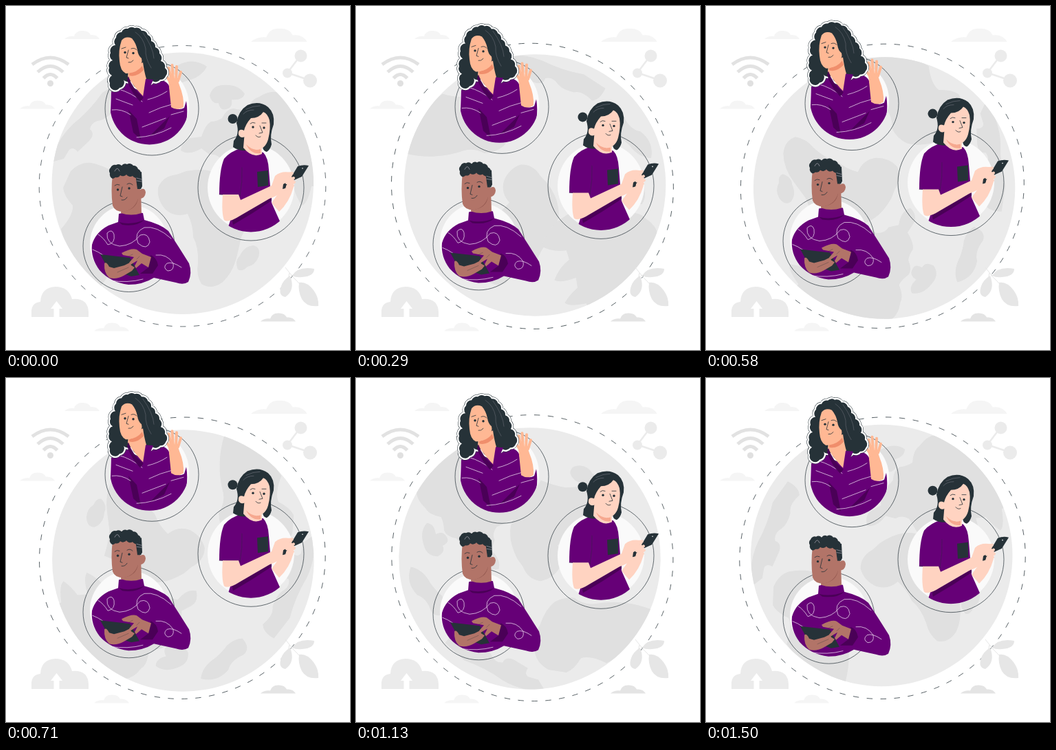
Recreate the animation shown at these times as an HTML page. Size 500x500 px, loop 1.54 s.

```html
<!DOCTYPE html>
<html lang="en">
<head>
<meta charset="utf-8">
<title>Connected people</title>
<style>
  html, body { margin: 0; width: 100%; height: 100%; overflow: hidden; background: #fff; }
  svg { display: block; width: 100%; height: 100%; }
  .pale { fill: #f5f5f5; }
  .mist { fill: #ebebeb; }
  .land { fill: #e0e0e0; }
  .disk { fill: #fafafa; }
  .dark { fill: #263238; }
  .top { fill: #660077; }
  .fold { fill: #4a0057; }
  .line { fill: none; stroke: #263238; stroke-width: .8; stroke-linecap: round; }
  .ring { fill: none; stroke: #263238; stroke-width: .7; }
  .thread { fill: none; stroke: #eee0f0; stroke-width: .75; stroke-linecap: round; }
  .peach { --skin: #ffb894; }
  .rose { --skin: #ffd3c1; }
  .brown { --skin: #b27468; }
  .skin { fill: var(--skin); }
  .finger { fill: none; stroke: var(--skin); stroke-width: 4; stroke-linecap: round; stroke-linejoin: round; }
</style>
</head>
<body>
<svg viewBox="0 0 500 500">
  <defs>
    <clipPath id="globeClip"><circle cx="256.8" cy="257.8" r="190.2"/></clipPath>
    <clipPath id="womanClip"><path d="M140 20H290V144H266A57.5 57.5 0 0 1 151 144H140Z"/></clipPath>
    <clipPath id="manClip"><path d="M280 130H450V264H420A64 64.5 0 0 1 292 264H280Z"/></clipPath>
    <path id="cloud" d="M0 0Q6-5 14-4Q17-13 27-12Q35-12 38-6Q47-7 51 0Z"/>
  </defs>

  <g id="world">
    <circle class="mist" cx="256.8" cy="257.8" r="190.2"/>
    <g class="land" clip-path="url(#globeClip)">
      <path d="M221 264Q228 247 248 245L262 240Q285 236 298 240Q312 243 320 252L338 272Q346 292 362 304Q348 322 342 336L336 362Q330 388 314 402Q298 413 284 404Q276 390 279 374Q280 350 272 336Q272 318 264 302Q246 308 232 296Q219 282 221 264Z"/>
      <path d="M337 383Q332 370 340 363Q346 349 360 348Q371 351 367 365Q362 377 351 379Q343 387 337 383Z"/>
      <path d="M254 210Q256 194 268 192L284 190Q290 172 298 168Q306 168 314 163Q320 150 330 149Q342 152 350 150Q358 134 368 132Q384 122 396 126L440 150L460 262L444 262Q438 288 430 290Q422 278 418 264L404 260Q402 284 394 290Q380 276 376 258L362 256Q356 276 342 286Q328 276 318 250L314 224Q306 214 296 216L284 207Q266 218 254 210Z"/>
      <path d="M296 130Q300 116 314 115Q338 113 347 128Q343 138 328 136Q330 148 320 150Q311 153 309 141Q299 143 296 130Z"/>
      <path d="M180 131Q160 138 158 150Q148 163 138 166Q124 168 122 179Q130 186 121 196L104 212Q98 204 92 209L84 222L62 228Q76 192 97 172Q122 152 140 126L172 106Q184 120 180 131Z"/>
      <path d="M215 122Q208 104 222 99Q242 98 250 86Q272 74 292 88Q284 104 262 109Q248 114 240 120Q226 126 215 122Z"/>
      <path d="M94 240Q108 226 124 228Q150 234 160 246Q180 260 186 275Q190 290 184 305Q170 316 168 330Q166 352 158 372Q150 392 136 410L96 390L80 324Q98 304 97 290Q84 276 83 264Z"/>
    </g>
    <ellipse class="ring" cx="256.5" cy="261.7" rx="208.3" ry="204.2" pathLength="1300" stroke-dasharray="8.5 11.5"/>
  </g>

  <g class="pale">
    <use href="#cloud" x="85" y="48"/>
    <use href="#cloud" transform="translate(356 52)scale(1.6)"/>
    <use href="#cloud" x="20" y="149.5"/>
    <use href="#cloud" x="128" y="472.5"/>
    <use href="#cloud" x="370" y="458.5" fill="#e4e4e4"/>
  </g>
  <g fill="none" stroke="#e2e2e2" stroke-width="5">
    <path d="M38 85Q64.500 65 91 85M46 96Q64.500 79 83 96M54.500 105Q64.500 94 74.500 105"/>
    <circle class="land" cx="64.500" cy="112.500" r="4.500" stroke="none"/>
  </g>
  <path d="M428 72L409 97L442 108" fill="none" stroke="#ebebeb" stroke-width="2.5"/>
  <g class="mist">
    <circle cx="428.500" cy="72.500" r="9"/><circle cx="409" cy="97.500" r="7"/><circle cx="442" cy="108.500" r="10"/>
    <path d="M37 452V443Q38 431 50 430Q51 409 72 408Q91 408 96 426Q119 424 120 445V452Z"/>
    <path fill="#fff" d="M73.500 429L82 440H77.500V453H69.500V440H65Z"/>
  </g>
  <g fill="#e6e6e6">
    <path d="M416 392Q424 378 448 382Q448 393 430 394Q422 395 416 392Z"/>
    <path d="M413 392Q421 413 406 423Q395 421 400 407Q403 398 413 392Z"/>
    <path d="M426 402Q437 400 447 413Q455 424 454 436Q437 438 430 426Q424 414 426 402Z"/>
    <path d="M406 380Q416 394 427 404M412 388L407 412M414 392L430 387" fill="none" stroke="#e6e6e6"/>
  </g>

  <g id="people">
    <g class="peach">
      <circle class="ring" cx="212" cy="149" r="68"/>
      <circle class="disk" cx="208.500" cy="144" r="57.500"/>
      <g clip-path="url(#womanClip)">
        <path class="top" d="M153 125Q164 109 178 102L212 105Q232 106 237 116L243 146Q251 153 259 148L262 138Q268 174 246 205H150Z"/>
        <path class="fold" d="M178 151L190 164L196 194L185 184ZM208 190L238 160L230 178Z"/>
      </g>
      <path class="thread" d="M164 121Q182 126 198 139M206 136Q222 132 234 124M154 151Q168 149 181 158M208 155Q224 147 241 143M160 135L184 144M198 176L232 163M190 191Q216 190 240 177M240 158L258 153"/>
      <path class="skin" d="M236 108Q241 104 249 106L252 115Q259 132 258 147Q249 153 240 147Z"/>
      <path class="finger" d="M240 113L233 101M240 106L236.500 90M243 106L241.500 86M247 107L248 88M250 109L254 96"/>
      <g id="hairRim"></g>
      <path id="hair" class="dark"/>
      <path class="skin" d="M178 92L199 82Q201 96 204 106L201 133Q188 120 177 103Z"/>
      <path d="M179 97Q190 97 198 87L200 93Q190 104 179 101Z" fill="#f08e6c"/>
      <path class="fold" d="M178 102Q183 120 200 133L195 139Q183 128 176 108Z"/>
      <path class="top" d="M203 106L214 107L202 136L199 132Z"/>
      <path class="skin" d="M168 50Q163 64 165 80Q166 94 174 98Q186 99 193 87Q199 84 197 76Q192 72 191 64Q189 54 183 47Q174 43 168 50Z"/>
      <circle class="dark" cx="173" cy="67.500" r="1.700"/><circle class="dark" cx="185" cy="68.500" r="1.700"/>
      <path class="line" d="M168 62L174 60M182 62Q187 60 190 64M178 64L175 75L178 76M178 82Q182 83 185 79"/>
      <path class="thread" d="M188 38Q200 46 203 62Q202 76 211 90M199 39Q214 60 215 76" opacity=".25"/>
    </g>

    <g class="rose">
      <circle class="ring" cx="356" cy="264" r="77"/>
      <circle class="disk" cx="356" cy="264" r="63"/>
      <path class="skin" d="M402 264L418 263Q412 285 397 299L386 286Z"/>
      <path class="top" clip-path="url(#manClip)" d="M317 222Q326 211 344 206L374 213Q381 220 382 238L386 286L399 315L390 330H320L330 300L338 276L310 274Q310 238 317 222Z"/>
      <path class="fold" d="M328 308L346 300L386 276L386 283Q358 302 330 318Z"/>
      <path class="line" d="M340 276Q344 255 343 235M310 274L340 275" opacity=".5"/>
      <path class="dark" d="M365 241L381 239V261L366 263Z"/>
      <path class="skin" d="M315 274H338L341 282L386 261L391 247Q400 239 414 242L420 249Q418 260 408 266Q395 276 383 280L340 305Q323 316 317 311Q313 301 315 274Z"/>
      <path class="dark" d="M415 248L424 233Q432 230 440 232L430 248L419 253ZM403 259L410 255L406 265L402 266Z"/>
      <circle fill="#fff" cx="431" cy="236" r=".8"/>
      <path class="finger" d="M396 246L416 243M408 257L418 250M409 262L419 256M408 267L417 261"/>
      <circle class="dark" cx="329.500" cy="164" r="7"/>
      <path class="dark" d="M335 170Q338 152 351 144Q368 137 381 147Q391 156 389 172Q383 188 386 201Q384 209 379 212Q373 211 373 203L348 210Q338 211 330 205L331 196Q340 186 335 170Z"/>
      <path class="skin" d="M347 182L372 200V215Q358 222 345 206Z"/>
      <path d="M349 201Q358 211 370 208V214Q356 216 349 201Z" fill="#f6a88f"/>
      <path class="skin" d="M356 163Q348 172 346 181Q337 177 338 187Q341 193 347 190Q350 205 364 209Q377 208 381 194Q385 178 383 166Q380 156 374 154Q368 163 356 163Z"/>
      <path class="thread" d="M349 150Q359 145 369 145M345 157Q350 151 360 151" opacity=".3"/>
      <circle class="dark" cx="359" cy="176" r="1.700"/><circle class="dark" cx="375" cy="177" r="1.700"/>
      <path class="line" d="M355 171Q358 168 362 170M372 170L378 170M369 174L373 184L368 185M363 188Q366 192 370 190"/>
    </g>

    <g class="brown">
      <circle class="ring" cx="178.500" cy="349" r="66.500"/>
      <circle class="disk" cx="179" cy="346" r="57"/>
      <path class="top" d="M164 302Q181 297 199 301L201 311Q225 317 236 327Q251 350 266 374Q271 388 265 401Q258 406 247 402L215 395Q199 405 178 405Q152 402 136 384Q123 367 125 347Q130 329 149 319L163 314Z"/>
      <path class="fold" d="M164 314Q181 319 201 311Q190 321 169 318ZM210 362Q219 365 221 377L213 389L195 389L207 380Z"/>
      <path class="thread" d="M134 332Q142 337 148 347Q159 345 157 332Q154 323 147 330Q145 346 165 349Q184 348 195 333Q207 329 209 343Q205 356 192 345Q185 329 201 322Q219 319 240 338M126 354Q134 357 141 362M218 362Q234 360 243 374Q245 385 235 385Q227 380 234 374Q242 371 255 380M151 399Q177 403 199 397"/>
      <path class="dark" d="M137 361L180 366L194 391L182 393L148 381Z"/>
      <path class="skin" d="M143 374Q146 371 150 379L157 381L172 377L180 373L182 377L187 380L183 385L171 392Q160 398 150 395Q142 388 143 374Z"/>
      <path class="skin" d="M168 359Q183 351 190 354L198 360L211 365L207 380L197 374L189 381L187 378L191 370L181 376L179 373L186 365L170 362Z"/>
      <path class="line" d="M162 387L178 380M184 361L178 364M190 368L194 364" opacity=".4"/>
      <path class="skin" d="M168 282L196 270L197 301Q182 306 167 301Z"/>
      <path d="M168 292Q183 292 192 279Q190 297 168 299Z" fill="#92574f"/>
      <path class="skin" d="M155 245Q152 269 155 290Q158 299 171 299Q187 296 192 280Q202 281 203 271Q202 263 195 267L192 245Z"/>
      <path id="curls" class="dark"/>
      <path class="dark" d="M188 244L197 241L198 262L196 266H191Z"/>
      <circle class="dark" cx="162.500" cy="267" r="1.700"/><circle class="dark" cx="179" cy="265" r="1.700"/>
      <path class="line" d="M158 261Q161 258 165 260M176 259Q180 256 184 260M169 263L166 276L169 277M168 282Q173 283 176 278"/>
      <path class="thread" d="M190 250L197 252M190 254L197 255M158 240Q162 232 165 240" opacity=".6"/>
    </g>
  </g>
</svg>
<script>
  const $ = id => document.getElementById(id);

  // Outline of round bumps running clockwise through the points.
  const bumps = (r, text) => {
    const [first, ...rest] = text.split(' ');
    return `M${first}` + rest.map(p => `A${r} ${r} 0 0 1 ${p}`).join('') + 'Z';
  };

  const hair = bumps(8, '156,122 151,112 154,101 150,90 155,79 152,68 159,57 160,46 168,38 177,33 187,32 197,36 206,42 211,51 217,60 223,69 225,80 231,90 232,102 224,107 213,109 202,113 184,106 170,106 165,119 156,122');
  $('hair').setAttribute('d', hair);
  $('hairRim').innerHTML =
    `<path d="${hair}" fill="none" stroke="#263238" stroke-width="5.6"/>` +
    `<path d="${hair}" fill="none" stroke="#fff" stroke-width="4.6"/>`;
  $('curls').setAttribute('d', bumps(6.5, '155,251 151,243 152,235 160,231 168,232 176,230 185,232 192,237 196,243 193,249 184,247 175,245 166,246 159,249 155,251'));

  const LOOP = 1540, TURN = 1600;
  let start;
  function draw(now) {
    start ??= now;
    const turn = (now - start) % LOOP / TURN;
    $('world').setAttribute('transform', `rotate(${turn * 360} 256.4 261.7)`);
    $('people').setAttribute('transform', `translate(0 ${-4.5 * (1 - Math.cos(turn * 2 * Math.PI))})`);
    requestAnimationFrame(draw);
  }
  requestAnimationFrame(draw);
</script>
</body>
</html>
```
